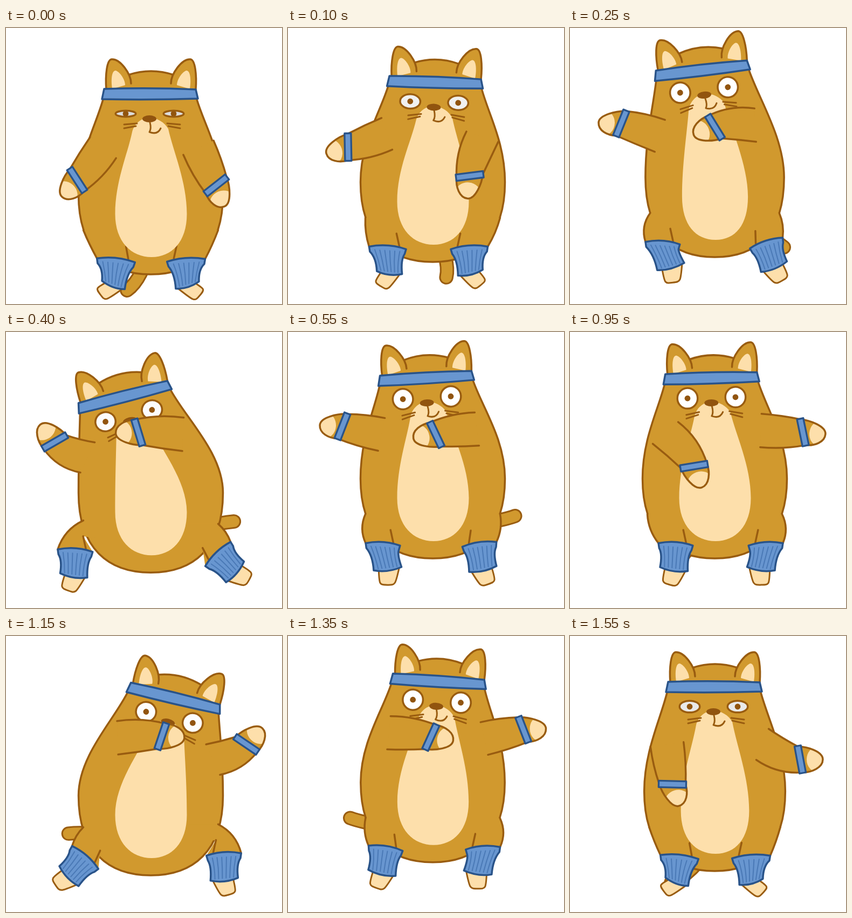
Write an HTML page with a canvas that moves like this. It is 512 px wide and 512 px high and loops after 1600 ms.

```html
<!DOCTYPE html>
<html lang="en">
<head>
<meta charset="utf-8">
<title>Dancing cat</title>
<style>
  html, body { margin: 0; width: 100%; height: 100%; overflow: hidden; background: #fff; }
  canvas { display: block; width: 100vw; height: 100vh; }
</style>
</head>
<body>
<canvas id="stage" width="512" height="512"></canvas>
<script>
const ctx = document.getElementById('stage').getContext('2d');
const LOOP = 1600, STEP = 50, TURN = 780, MIRROR = 537, MID = MIRROR / 2;
const FUR = '#d1992e', LINE = '#995c10', CREAM = '#fddfab';
const BLUE = '#6896d0', NAVY = '#295389', RIB = '#4a79b6', NOSE = '#91540f';

// The second half of the dance is the first half mirrored.
// Right limbs use mirrored coordinates, so both sides share one routine.
// body: lean, base, stretch; arm: wrist x, y, hand angle; leg: knee x, shin angle
const makePose = (body, armL, armR, legL, legR) => ({ body, armL, armR, legL, legR });

const crouch = makePose([0, 457, 0], [132, 282, 132], [147, 292, 111], [204, 6], [203, 3]);
const rise = makePose([5, 420, 0], [105, 186, 175], [230, 249, 70], [174, -11], [196, 4]);
const swing = makePose([-22, 425, 12], [95, 177, 182], [268, 184, 20], [172, -19], [173, 18]);
const sway = makePose([-45, 444, -6], [91, 201, 225], [289, 186, 4], [133, 1], [147, 41]);
const settle = makePose([-11, 420, 0], [101, 175, 183], [263, 190, 10], [176, -11], [182, 8]);
const drop = makePose([0, 436, 7], [110, 229, 180], [190, 275, 73], [201, 0], [203, 6]);

const keys = [
  [0, crouch], [.207, rise], [.32, swing], [.451, sway],
  [.55, sway], [.63, swing], [.705, settle], [.939, drop]
];

function flip({ body: [lean, ...rest], armL, armR, legL, legR }) {
  return makePose([-lean, ...rest], armR, armL, legR, legL);
}

function keyAt(i) {
  const n = keys.length, lap = Math.floor(i / n);
  const [phase, pose] = keys[i - lap * n];
  return [phase + lap, lap % 2 ? flip(pose) : pose];
}

// Smooth cubic through the unevenly spaced keys.
function poseAt(phase) {
  let i = keys.length - 1;
  while (keys[i][0] > phase) i--;
  const [[t0, p0], [t1, p1], [t2, p2], [t3, p3]] = [i - 1, i, i + 1, i + 2].map(keyAt);
  const h = t2 - t1, u = (phase - t1) / h, v = 1 - u;
  const blend = part => p1[part].map((a, k) => {
    const b = p2[part][k];
    const ma = (b - p0[part][k]) / (t2 - t0) * h;
    const mb = (p3[part][k] - a) / (t3 - t1) * h;
    return a * (1 + 2 * u) * v * v + ma * u * v * v + b * u * u * (3 - 2 * u) - mb * u * u * v;
  });
  return Object.fromEntries(Object.keys(p1).map(part => [part, blend(part)]));
}

const rad = deg => deg * Math.PI / 180;
const clamp = x => Math.max(0, Math.min(1, x));
const mix = (p, q, k) => [p[0] + (q[0] - p[0]) * k, p[1] + (q[1] - p[1]) * k];
const add = (p, x, y) => [p[0] + x, p[1] + y];
const polar = (p, angle, r) => add(p, Math.cos(rad(angle)) * r, Math.sin(rad(angle)) * r);
const heading = (p, q) => Math.atan2(q[1] - p[1], q[0] - p[0]) * 180 / Math.PI;
const bent = (p, q, bend) => polar(mix(p, q, .5), heading(p, q) + 90, bend);
const move = p => ctx.moveTo(...p);
const line = p => ctx.lineTo(...p);
const quad = (c, p) => ctx.quadraticCurveTo(...c, ...p);
const cubic = (a, b, p) => ctx.bezierCurveTo(...a, ...b, ...p);

function shape(draw, fill, stroke, width = 3.5) {
  ctx.beginPath();
  draw();
  if (fill) { ctx.fillStyle = fill; ctx.fill(); }
  if (stroke) { ctx.strokeStyle = stroke; ctx.lineWidth = width; ctx.stroke(); }
}

function mirrored(draw) {
  ctx.save();
  ctx.translate(MIRROR, 0);
  ctx.scale(-1, 1);
  draw();
  ctx.restore();
}

// Everything that follows from the lean, base and stretch of the body.
function measure([lean, base, stretch]) {
  const squat = base - 420 - Math.abs(lean) / 2;
  const x = MID - 1.5 + lean, y = base - 334 - stretch, tilt = lean * .3;
  return {
    lean, base, x, y, tilt,
    width: 134 - .45 * Math.max(0, stretch),
    relax: clamp(squat / 16),
    open: 1 - clamp(squat / 26),
    at: (px, py) => polar(polar([x, y], tilt, px), tilt + 90, py)
  };
}

function drawTail(phase, base) {
  const beat = Math.PI * (phase - .08), s = Math.sin(beat);
  const root = [MID, base - 60], angle = 90 - 105 * s, reach = 80 + 80 * Math.abs(s);
  const path = () => {
    move(root);
    quad(polar(root, angle - 15 * Math.cos(beat), reach * .7), polar(root, angle, reach));
  };
  shape(path, null, LINE, 26.5);
  shape(path, null, FUR, 20.5);
}

function drawBody({ at, base, width }) {
  const left = at(-86, 6), right = at(86, 6), low = [MID, base];
  const hipL = [MID - width, base - 148], hipR = [MID + width, base - 148];
  shape(() => {
    move(left);
    line(at(-78, -14));
    line(at(-40, -36));
    quad(at(2, -50), at(44, -36));
    line(at(80, -14));
    line(right);
    cubic(mix(right, hipR, .27), add(hipR, 0, -75), hipR);
    cubic(add(hipR, 0, 104), add(low, 78, 0), low);
    cubic(add(low, -78, 0), add(hipL, 0, 104), hipL);
    cubic(add(hipL, 0, -75), mix(left, hipL, .27), left);
  }, FUR, LINE);
}

function drawBelly({ at, base, width }) {
  const top = at(-1, 43), left = at(-33, 70), right = at(34, 64), low = [MID + 1.5, base - 32];
  const sideL = [MID + 68 - width, base - 112], sideR = [MID - 67 + width, base - 112];
  shape(() => {
    move(top);
    cubic(at(-16, 44), at(-29, 54), left);
    cubic(mix(left, sideL, .27), add(sideL, 0, -60), sideL);
    cubic(add(sideL, 0, 52), add(low, -37, 0), low);
    cubic(add(low, 37, 0), add(sideR, 0, 52), sideR);
    cubic(add(sideR, 0, -60), mix(right, sideR, .27), right);
    cubic(at(27, 52), at(14, 44), top);
  }, CREAM);
}

function legParts([x, shin], { base, relax }) {
  const lift = Math.max(0, 165 - x) * .4;
  const knee = [x, base - 26 - lift], slope = Math.max(4, shin);
  const ankle = polar(knee, shin + 90, 46), cuff = shin + 4 + 10 * relax;
  const half = 32 + 3.5 * relax, halfLow = 26 - 3.5 * relax;
  return {
    shin, lift, slope, ankle,
    outer: polar(knee, slope, -half), inner: polar(knee, slope, half),
    lowOuter: polar(ankle, cuff, -halfLow), lowInner: polar(ankle, cuff, halfLow),
    toe: polar(ankle, shin + 102 + 35 * relax, 30)
  };
}

function drawThigh(leg, body) {
  const { shin, lift, slope, outer, inner } = legParts(leg, body);
  const hip = [MID + 9 - body.width, body.base - 82 - lift];
  const bulge = bent(hip, outer, (10 - .2 * shin) * (1 - .8 * body.relax) + lift * .5);
  const crease = polar(inner, slope - 125.5, 34);
  shape(() => {
    move(hip); quad(bulge, outer); line(inner); line(crease);
    line([MID - 70, body.base - 60]); line([MID - 70, hip[1]]);
  }, FUR);
  shape(() => {
    move(hip); quad(bulge, outer);
    move(crease); line(polar(inner, slope - 159, 14));
  }, null, LINE);
}

function drawLeg(leg, body) {
  const { slope, outer, inner, lowOuter, lowInner, ankle, toe } = legParts(leg, body);
  const side = heading(ankle, toe) + 90, up = slope - 90;
  const cornerL = polar(toe, side, 15), cornerR = polar(toe, side, -15);
  shape(() => {
    move(mix(lowOuter, lowInner, .18));
    cubic(cornerL, cornerL, toe);
    cubic(cornerR, cornerR, mix(lowOuter, lowInner, .92));
  }, CREAM, LINE, 3);

  const pinch = (top, low, across) => mix(mix(top, low, .5), across, .1);
  shape(() => {
    move(outer);
    quad(polar(mix(outer, inner, .5), up, 9), inner);
    line(polar(mix(inner, outer, .03), up, -9));
    quad(pinch(inner, lowInner, outer), lowInner);
    quad(polar(ankle, up, -8), lowOuter);
    quad(pinch(outer, lowOuter, inner), polar(mix(outer, inner, .03), up, -9));
    ctx.closePath();
  }, BLUE, NAVY);
  shape(() => {
    for (let k = .16; k < .9; k += .135) {
      const top = polar(mix(outer, inner, k), up, -5), end = polar(mix(lowOuter, lowInner, k), up, 2);
      move(top);
      quad(pinch(top, end, mix(outer, lowInner, .5)), end);
    }
  }, null, RIB, 2);
}

function drawEar(side) {
  ctx.save();
  ctx.translate(2, 0);
  ctx.scale(side, 1);
  shape(() => {
    move([-83, -9]);
    cubic([-85, -36], [-82, -64], [-73, -65]);
    cubic([-57, -66], [-37, -38], [-37, -20]);
  }, FUR, LINE);
  shape(() => {
    move([-72, -10]);
    cubic([-75, -30], [-72, -44], [-66, -44]);
    cubic([-59, -43], [-48, -28], [-48, -17]);
  }, CREAM);
  ctx.restore();
}

function drawEye(x, open) {
  const shade = 220 + 35 * open;
  const oval = () => ctx.ellipse(x, 36, 18.8, 5.7 + 13.3 * open, 0, 0, 7);
  ctx.save();
  shape(oval, `rgb(${shade},${shade},${shade})`);
  ctx.clip();
  shape(() => ctx.arc(x, 36, 5.4, 0, 7), NOSE);
  ctx.restore();
  shape(oval, null, LINE);
}

function drawHead({ x, y, tilt, open }) {
  ctx.save();
  ctx.translate(x, y);
  ctx.rotate(rad(tilt));
  drawEar(1);
  drawEar(-1);
  shape(() => {
    move([-85, -10]);
    quad([0, -13], [85, -9]);
    line([89, 8]);
    quad([0, 11], [-89, 9]);
    ctx.closePath();
  }, BLUE, NAVY);
  drawEye(-45, open);
  drawEye(44, open);
  shape(() => {
    for (const side of [-1, 1]) for (const row of [0, 1]) {
      move([4 + side * (28 + 2 * row), 54 + 5 * row + 8 * open]);
      line([4 + side * 52, 56 + 7 * row + 10.5 * open]);
    }
    move([0, 52]); quad([3, 64], [-1, 70]);
    quad([14, 76], [20, 63]);
  }, null, LINE, 3);
  shape(() => ctx.ellipse(-1, 45.5, 13, 6.5, 0, 0, 7), NOSE);
  ctx.restore();
}

// The shoulder opens square to the line towards the wrist; the twist of the hand bends the edges.
function drawArm([x, y, hand], lean, base) {
  const wrist = [x, y], shoulder = [180 + .6 * lean, base - 235 - .45 * lean];
  const aim = (heading(shoulder, wrist) + 450) % 360 - 180;
  const twist = hand - 90 - aim, band = hand + 16 - .25 * twist;
  const a = polar(shoulder, aim, 31), b = polar(shoulder, aim, -31);
  const edgeA = polar(wrist, band - 90, 24.5), edgeB = polar(wrist, band + 90, 24.5);
  const tip = polar(wrist, hand, 42);
  const outline = () => {
    move(a);
    quad(bent(a, edgeA, -7 - .4 * twist), edgeA);
    cubic(polar(edgeA, hand, 17), polar(tip, hand - 90, 15), tip);
    cubic(polar(tip, hand + 90, 15), polar(edgeB, hand, 17), edgeB);
    quad(bent(b, edgeB, 2 - .17 * twist), b);
  };
  shape(outline, FUR);
  ctx.save();
  ctx.clip();
  shape(() => ctx.ellipse(...polar(wrist, hand, 33), 21, 24, rad(hand), 0, 7), CREAM);
  ctx.restore();
  shape(outline, null, LINE);

  ctx.save();
  ctx.translate(x, y);
  ctx.rotate(rad(band));
  shape(() => ctx.rect(-6, -25.5, 12, 51), BLUE, NAVY, 3.3);
  ctx.restore();
}

function draw(t) {
  const second = t >= TURN;
  const phase = second ? (t - TURN) / (LOOP - TURN) : t / TURN;
  const pose = second ? flip(poseAt(phase)) : poseAt(phase);
  const body = measure(pose.body);
  const tail = () => drawTail(phase, body.base);
  ctx.fillStyle = '#fff';
  ctx.fillRect(0, 0, 512, 512);
  ctx.lineCap = ctx.lineJoin = 'round';
  second ? mirrored(tail) : tail();
  drawBody(body);
  drawThigh(pose.legL, body);
  mirrored(() => drawThigh(pose.legR, body));
  drawBelly(body);
  drawLeg(pose.legL, body);
  mirrored(() => drawLeg(pose.legR, body));
  drawHead(body);
  drawArm(pose.armL, body.lean, body.base);
  mirrored(() => drawArm(pose.armR, -body.lean, body.base));
}

const start = performance.now();
function tick() {
  const t = (performance.now() - start) % LOOP;
  draw(Math.floor(t / STEP) * STEP);
  requestAnimationFrame(tick);
}
tick();
</script>
</body>
</html>
```
